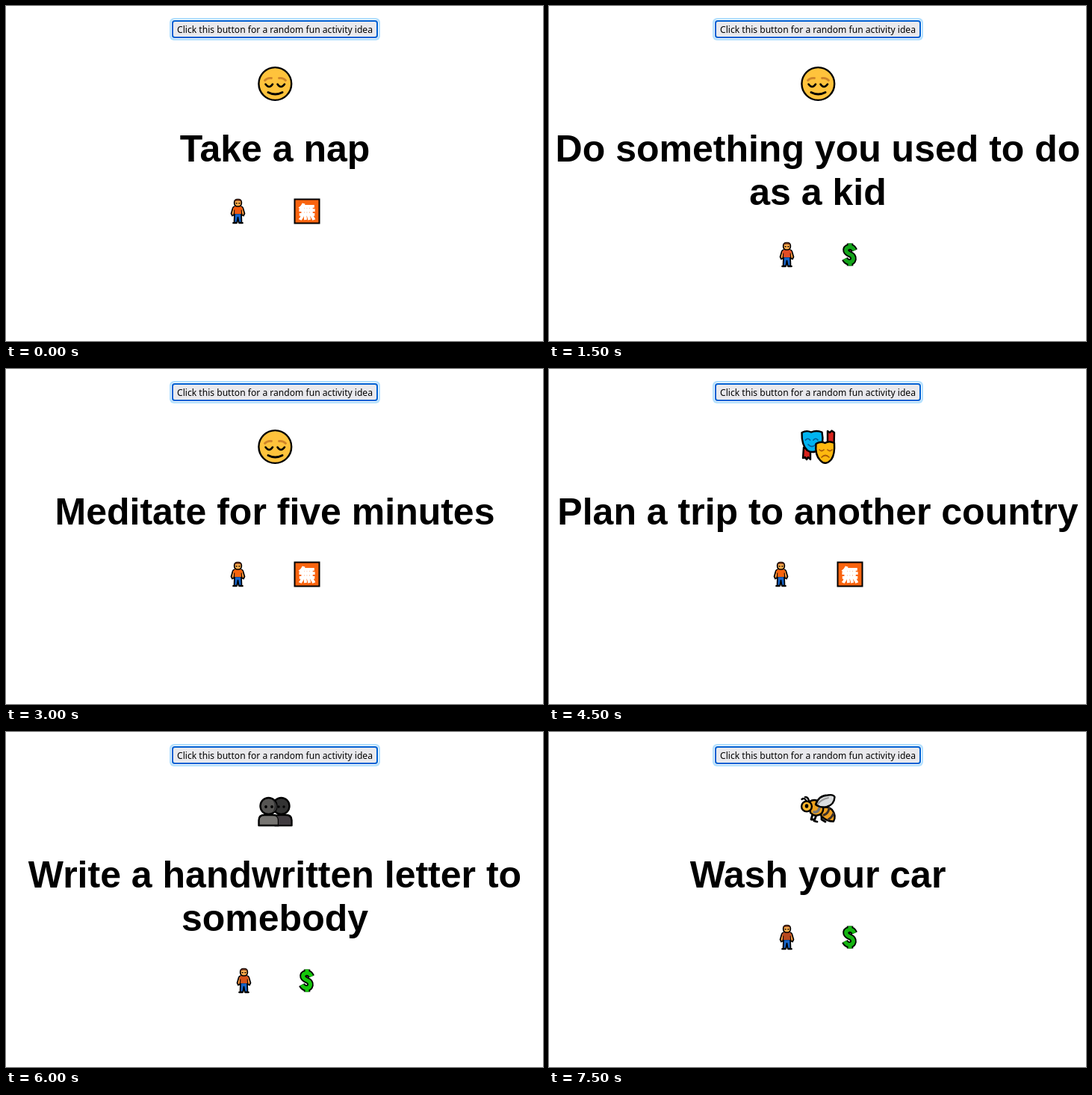
These frames come from a looping animation (719 by 448 pixels, 8 s). An HTML page:

```html
<!DOCTYPE html>
<html lang="en">
<head>
<meta charset="utf-8">
<title>Random activity ideas</title>
<style>
  html, body { margin: 0; width: 100%; height: 100%; overflow: hidden; background: #fff; }
  svg { display: block; }
  text { text-anchor: middle; }
  .label { font: 12.1px "Noto Sans", sans-serif; }
  .idea { font: bold 50px "Liberation Sans", Arial, sans-serif; font-variant-ligatures: none; }
  .kanji { font: 900 22px "Noto Sans CJK JP", "Noto Sans CJK", sans-serif; fill: #fff; stroke: #fff; stroke-width: 1.3; }
  .ink { stroke: #000; stroke-width: 2.4; stroke-linejoin: round; stroke-linecap: round; }
  .thin { stroke-width: 1.7; }
  .line { fill: none; stroke-linecap: round; stroke-linejoin: round; }
</style>
</head>
<body>
<svg width="719" height="448" viewBox="0 0 719 448">
  <defs>
    <!-- Large icons: 46 px wide, origin at the top left -->
    <g id="relieved">
      <circle class="ink" cx="23.3" cy="23" r="21.9" fill="#ffc33c"/>
      <path class="line" stroke="#cf8428" stroke-width="2.8" d="M9.5 18.5Q13 14.5 18.5 15.5M28.5 15.5Q34 14.5 37.5 18.5"/>
      <g class="line" stroke="#000" stroke-width="2.6">
        <path d="M10.5 23.5Q15.5 30.5 20 23.5M26.5 23.5Q31 30.5 36 23.5"/>
        <path d="M14 34.5Q23.5 39.5 33 34.5" stroke-width="3"/>
      </g>
    </g>

    <g id="masks">
      <g class="ink" fill="#d8231c">
        <path d="M4 24L3 38L6 37L8 40L10 37L13 40L13 28Z"/>
        <path d="M36 17V2L39 4L41.500 1.500L45 4L44.500 24Z"/>
      </g>
      <path class="ink" fill="#00b3f0" d="M1.500 4Q8 0.500 14 3.500Q21 0.500 28.500 3.500Q31.500 19 25 26Q17 33 9 28Q1 21 1.500 4Z"/>
      <path class="line" stroke="#07578f" stroke-width="1.700" d="M6.500 14Q9.500 10.500 12.500 14M17 14Q20 10.500 23 14M10 20Q15 25 20 20"/>
      <path class="ink" fill="#ffb90f" d="M20.500 19Q27 15 32.500 18Q38 14.500 45 18Q46 33 41 40Q33 49 26 41Q19 34 20.500 19Z"/>
      <path class="line" stroke="#a85a08" stroke-width="1.700" d="M25 27Q28 30 31 27M36 27Q39 30 42 27M28 37Q33 32 38 37"/>
    </g>

    <g id="busts">
      <circle class="ink" cx="31.500" cy="18" r="11" fill="#333"/>
      <path class="ink" fill="#3d383c" d="M23 44V36Q23 30 30 30H38Q45.500 30 45.500 37V44Z"/>
      <circle class="ink" cx="14.500" cy="18" r="11" fill="#565553"/>
      <path d="M20 10Q25 17 20 27Q27 23 25.500 17Q24 12 20 10Z" fill="#333"/>
      <path class="ink" fill="#777572" d="M1.500 44V37Q1.500 30 9 30H21Q28 30 28 37V44Z"/>
      <path d="M28 43V37Q28 33 25 31.500H36Q44 31 44.300 38V43Z" fill="#413c40"/>
      <g><circle cx="11" cy="19" r="1.900"/><circle cx="19" cy="19" r="1.900"/>
         <circle cx="28" cy="19" r="1.700"/><circle cx="35" cy="19" r="1.700"/></g>
    </g>

    <g id="bee">
      <path class="line" stroke="#000" stroke-width="2.800" d="M16 29L14 36H17M21 30L18 38L22 39M28 31L28 36L33 39"/>
      <path class="line" stroke="#000" stroke-width="2.400" d="M1.500 9Q5 6 8 12M6 6Q11 6 11 13"/>
      <path class="ink" fill="#f0a020" d="M24 22Q34 16 42 23Q48 31 44 38.500Q36 39 28 32Z"/>
      <path class="line" stroke="#3b3029" stroke-width="3" d="M31 30Q37 28 38 21M37 36Q42 33 44 28"/>
      <path class="ink" fill="#eda01c" d="M12 12Q19 7 27 14Q33 21 28 28Q20 34 13 27Z"/>
      <path class="line" stroke="#777" stroke-width="3.500" d="M18 26Q23 27 25 21"/>
      <path class="ink" fill="#dcdedf" d="M20 16Q24 4 36 3.500Q44 2 45.500 6Q45 16 35 19Q27 21 20 16Z"/>
      <path class="line" stroke="#999" stroke-width="2" d="M23 15Q28 9 37 7"/>
      <circle class="ink" cx="8" cy="18.500" r="6.900" fill="#ffb72b"/>
      <ellipse cx="8" cy="18" rx="2.300" ry="2.800"/>
    </g>

    <!-- Small icons: 34 px tall, origin at the top centre -->
    <g id="person">
      <path class="ink thin" fill="#ff9d40" d="M-4 10.500Q-7 11 -7.500 15L-9 20L-7.500 23L-5.500 22L-4 17H4L5.500 22L7.500 23L9 20L7.500 15Q7 11 4 10.500Z"/>
      <path class="ink thin" fill="#1664c8" d="M-4.500 20H4.500L5 32H1.200L0 25L-1.200 32H-5Z"/>
      <path d="M-4 10.500H4L6.300 13L4.500 20.500H-4.500L-6.300 13Z" fill="currentColor"/>
      <path class="line" stroke="#000" stroke-width="1" d="M-4.700 15.500L-5 20M4.700 15.500L5 20"/>
      <rect class="ink thin" x="-4.800" y="1" width="9.600" height="9.500" rx="4" fill="#ffad4c"/>
      <path d="M-4.800 4.500Q-4.500 1 0 1Q4.500 1 4.800 4.500L3 3.500Q0 2.500 -3 3.500Z" fill="#693019"/>
      <path class="line" stroke="#000" stroke-width="1.500" d="M-2.200 6.200H-1.500M1.500 6.200H2.200"/>
      <path class="line" stroke="#000" stroke-width="2.300" d="M-6.200 32.700H-1.800M1.800 32.700H6.200"/>
    </g>

    <g id="free">
      <rect x="-16.500" y="1" width="33" height="32" fill="#fa640f" stroke="#000" stroke-width="2"/>
      <text class="kanji" y="25">無</text>
    </g>

    <path id="dollarShape" d="M6.500 11.500Q4 6 -1 7Q-5.500 8 -4.800 12Q-4 14.500 0.500 16.500Q5.500 18.500 5 23Q4 27.500 -1 27Q-4.500 26.500 -6.500 22.500M0.500 2V7M0.500 27V32"/>
    <g id="dollar" fill="none">
      <use href="#dollarShape" stroke="#000" stroke-width="8.600"/>
      <use href="#dollarShape" stroke="currentColor" stroke-width="5"/>
    </g>
  </defs>

  <rect x="219" y="16" width="282" height="30" rx="6" fill="#b2dffd"/>
  <rect x="221" y="18" width="278" height="26" rx="5" fill="#fff"/>
  <rect x="222" y="19" width="276" height="24" rx="4" fill="#0060d3"/>
  <rect x="224" y="21" width="272" height="20" rx="2" fill="#e9e9ed"/>
  <text class="label" x="360" y="36">Click this button for a random fun activity idea</text>
  <g id="scene"></g>
</svg>
<script>
  const SCENE_MS = 1500, LOOP_MS = 8000;

  const scenes = [
    { icon: "relieved", lines: ["Take a nap"], shirt: "#f2590f" },
    { icon: "relieved", lines: ["Do something you used to do", "as a kid"], shirt: "#e44c25", money: "#13a51a" },
    { icon: "relieved", lines: ["Meditate for five minutes"], shirt: "#f7630c" },
    { icon: "masks", lines: ["Plan a trip to another country"], shirt: "#f7630c" },
    { icon: "busts", lines: ["Write a handwritten letter to", "somebody"], shirt: "#d65218", money: "#16c60c" },
    { icon: "bee", lines: ["Wash your car"], shirt: "#b9481e", money: "#16b512" }
  ];

  const place = (id, x, y, color = "#000") =>
    `<use href="#${id}" x="${x}" y="${y}" color="${color}"/>`;

  function markup({ icon, lines, shirt, money }) {
    const rowTop = 200 + lines.length * 58 - 0.5;
    const text = lines.map((line, i) =>
      `<text class="idea" x="360" y="${208 + i * 58}">${line}</text>`).join("");
    return place(icon, 337, 81) + text
      + place("person", money ? 318.5 : 310.5, rowTop, shirt)
      + place(money ? "dollar" : "free", money ? 402.5 : 403, rowTop, money);
  }

  const stage = document.getElementById("scene");
  const start = performance.now();
  let shown = -1;

  function draw() {
    const index = Math.floor((performance.now() - start) % LOOP_MS / SCENE_MS);
    if (index !== shown) {
      stage.innerHTML = markup(scenes[index]);
      shown = index;
    }
    requestAnimationFrame(draw);
  }
  draw();
</script>
</body>
</html>
```
